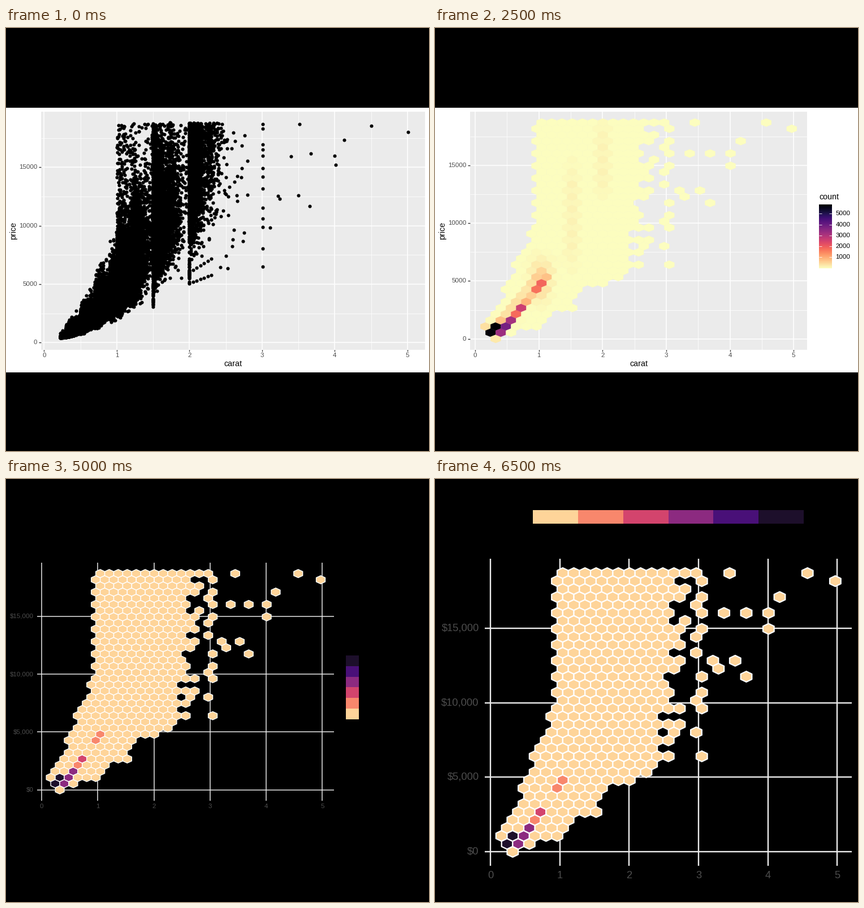
Recreate the animation shown at these times as a matplotlib script. Size 748x748 px, loop 8000 ms.

```python
import numpy as np
import matplotlib.pyplot as plt
from matplotlib.animation import FuncAnimation
from matplotlib.collections import LineCollection, PolyCollection
from matplotlib.colors import LinearSegmentedColormap, to_rgba_array
from matplotlib.patches import Rectangle

SIZE, DPI = 748, 100
PX = 72 / DPI
STEP_X, STEP_Y = 4.81 / 30, 18497 / 30
ROW_Y = STEP_Y * np.sqrt(3) / 2
HEX_MAX, BIN_MAX = 5830, 7520
plt.rcParams["font.family"] = "Liberation Sans"
BLUES = LinearSegmentedColormap.from_list("blues", ["#132B43", "#336D9B", "#56B1F7"])
MAGMA, MAGMA_R = plt.get_cmap("magma"), plt.get_cmap("magma_r")
STEP_COLORS = to_rgba_array(["#FED499", "#F8876C", "#D3446D",
                             "#8C2A80", "#491078", "#1D0F2B"])


class View:
    """Maps data to stage pixels inside a panel."""

    def __init__(self, left, right, top, bottom, x0, sx, y0, per_5000):
        self.left, self.right, self.top, self.bottom = left, right, top, bottom
        self.x0, self.sx, self.y0, self.sy = x0, sx, y0, per_5000 / 5000

    def x(self, carat):
        return self.x0 + self.sx * np.asarray(carat)

    def y(self, price):
        return self.y0 - self.sy * np.asarray(price)

    def project(self, shapes):
        return np.stack([self.x(shapes[..., 0]), self.y(shapes[..., 1])], -1)


POINT_VIEW = View(61.5, 741, 147.7, 568.3, 67, 128.5, 555.7, 103.27)
BIN_VIEW = View(61.5, 657.5, 147.7, 568.3, 71.2, 109, 549.2, 100)
HEX_VIEW = View(61.5, 657.5, 147.7, 568.3, 70.7, 112.6, 549.2, 102.33)
DOLLAR_VIEW = View(54.7, 580, 147.7, 568.3, 62.7, 99.25, 549.2, 102.33)
TOP_VIEW = View(54.7, 741, 215.6, 568.3, 65.2, 129.65, 552.2, 85.6)
WIDE_VIEW = View(54.7, 741, 228.5, 568.3, 65.2, 129.65, 552.8, 82.55)
LARGE_VIEW = View(87.5, 737, 141, 683.5, 97.5, 122.7, 658.8, 131.85)


def bump(value, center, width, power=2):
    return np.exp(-np.abs((value - center) / width) ** power)


# ---- data -------------------------------------------------------------

def stray_points(rng):
    """Lone large stones: a column at three carats, far ones and a loose fringe."""
    column = [6510, 8040, 9900, 10600, 11550, 13200, 14200,
              14900, 16000, 16500, 16950, 18300, 18700]
    far = [(3.11, 9820), (3.22, 12550), (3.24, 12300), (3.4, 15960),
           (3.5, 12580), (3.51, 18700), (3.65, 11660), (3.67, 16200),
           (4, 15980), (4.01, 15220), (4.13, 17330), (4.5, 18530), (5.01, 18018)]
    fringe = np.c_[rng.uniform(2.42, 2.8, 26), rng.uniform(6300, 18750, 26)]
    return np.r_[[(3.005, p) for p in column], far, fringe]


def gem_points(rng):
    """Stones gather just above round weights; price grows with a power of weight."""
    weights = [.22, .3, .5, .7, .9, 1, 1.2, 1.5, 1.7, 2, 2.25]
    amounts = [600, 16000, 6500, 7500, 2200, 9000, 4200, 4200, 600, 3000, 450]
    start = np.repeat(weights, amounts)
    carat = np.round(start + rng.exponential(.03 + .03 * start), 2)
    z = rng.normal(size=carat.size)
    sigma = np.where(z < 0, .25, np.where(carat < 1, .25, .29))
    price = np.exp(8.45 + 1.676 * np.log(carat) + sigma * z)
    low = 320 + 1850 * carat ** 2 * np.where(carat > 1.5, .6, .85)
    high = np.where(carat < 1, 400 + 9600 * carat ** 1.55, 18823)
    keep = (price > low) & (price < high) & (carat < 2.65)
    parts = [np.c_[carat, price][keep]]
    # Expensive stones over the one-carat block and tall columns at round weights.
    top = np.round(1 + rng.exponential(.17, 230).clip(0, .48), 2)
    parts.append(np.c_[top, rng.uniform(10500, 18800, top.size)])
    for weight, bottom, n in [(1.5, 3000, 260), (2, 5050, 160)]:
        parts.append(np.c_[np.full(n, weight), rng.uniform(bottom, 18800, n)])
    for bottom, rise in [(5050, 2450), (6000, 3900)]:
        line = np.linspace(2, 2.3, 7)
        parts.append(np.c_[line, bottom + rise * (line - 2)])
    return np.concatenate(parts)


RNG = np.random.default_rng(7)
STRAYS = stray_points(RNG)
GEMS = np.r_[gem_points(RNG), STRAYS]


# ---- binning ----------------------------------------------------------

def inside(col, row):
    """Whether a place, in hexagon columns and rows, lies in the filled cloud."""
    left = np.interp(row, [0, 2, 7, 9, 11, 13, 15, 19, 35],
                     [2, 1, 3, 3, 3.6, 4, 5.05, 5.6, 6])
    right = np.interp(row, [0, 1, 2, 4, 5, 8, 10, 13, 20, 34, 35],
                      [2.2, 4.4, 6.2, 7.6, 9.6, 10.2, 14.8, 14.9, 15.6, 16.6, 18.6])
    return left - .01 <= col <= right


def nearest_hex(carat, price):
    col, row = carat / STEP_X, price / ROW_Y
    options = []
    for r in (int(row), int(row) + 1):
        shift = r % 2 / 2
        options.append((round(col - shift) + shift, r))
    return min(options, key=lambda c: (c[0] - col) ** 2 + .75 * (c[1] - row) ** 2)


def hex_count(col, row):
    offset = col - 1 - row / 2
    small = 7600 * bump(offset, 0, .6) * bump(row, 1.5, .9)
    weights = (3450 * bump(row, 2, 1.55, 4) + 2600 * bump(row, 4.8, 1.1)
               + 1450 * bump(row, 8.5, 1.2)) * bump(offset, 1, .45)
    ridge = 400 * bump(row, 1.7 * col - 1.2, 1.2) * bump(col, 4, 2.5)
    haze = 600 * bump(col, 6.4, .9) * bump(row, 9.5, 3)
    stripes = (150 * bump(col, 9.5, .6) * bump(row, 20, 9, 4)
               + 150 * bump(col, 12.5, .6) * bump(row, 29, 6, 4))
    return 1 + small + weights + ridge + haze + stripes


def bin_count(col, row):
    u, v = col - 2, row - 1
    small = 7500 * np.exp(-(1.4 * u * u - 3.2 * u * v + 2.4 * v * v))
    ridge = 2100 * bump(col, 1 + .75 * row, .7) * bump(row, 4, 4.5)
    haze = 400 * bump(col, 6.4, 1.2) * bump(row, 9, 4)
    return 1 + small + ridge + haze


HEXES = {(c + r % 2 / 2, r) for r in range(36) for c in range(20)
         if inside(c + r % 2 / 2, r)}
HEXES = np.array(sorted(HEXES | {nearest_hex(*p) for p in STRAYS}))
BINS = {(c, r) for r in range(31) for c in range(20)
        if inside(c + .5, (r + .5) * STEP_Y / ROW_Y)}
BINS = np.array(sorted(BINS | {(int(c / STEP_X), int(p / STEP_Y)) for c, p in STRAYS}))
HEX_COUNTS = hex_count(*HEXES.T)
BIN_COUNTS = bin_count(*BINS.T)


# ---- drawing ----------------------------------------------------------

fig = plt.figure(figsize=(SIZE / DPI, SIZE / DPI), dpi=DPI, facecolor="black")
ax = fig.add_axes([0, 0, 1, 1])


def box(x0, x1, y0, y1, color):
    ax.add_patch(Rectangle((x0, y0), x1 - x0, y1 - y0, fc=color, ec="none"))


def lines(segments, color, width):
    ax.add_collection(LineCollection(segments, colors=color, linewidths=width * PX,
                                     capstyle="butt"))


def label(x, y, text, color="#4D4D4D", size=11.5, ha="center", **kw):
    ax.text(x, y, text, color=color, fontsize=size * PX, ha=ha, va="center", **kw)


def price_breaks(view):
    return [p for p in range(0, 20001, 5000) if view.y(p) > view.top]


def grid(view, color, minor=True, scale=1.0):
    def segments(xs, ys):
        return ([[(x, view.top), (x, view.bottom)] for x in view.x(xs)]
                + [[(view.left, y), (view.right, y)] for y in view.y(ys)])
    if minor:
        lines(segments(np.arange(.5, 5), np.arange(2500, 18000, 5000)), color, .75)
    lines(segments(np.arange(6), price_breaks(view)), color, 1.5 * scale)


def axis_labels(view, fmt="{}", scale=1.0):
    size = 11.5 * scale
    for carat in range(6):
        label(view.x(carat), view.bottom + 10.7 * scale, carat, size=size)
    for price in price_breaks(view):
        label(view.left - 6.5 * scale, view.y(price), fmt.format(price),
              size=size, ha="right")


def light_theme(view):
    box(-1, SIZE, 140.4, 608.4, "white")
    box(view.left, view.right, view.top, view.bottom, "#EBEBEB")
    grid(view, "white")
    ticks = [[(x, view.bottom), (x, view.bottom + 3.6)] for x in view.x(np.arange(6))]
    ticks += [[(view.left - 3.6, y), (view.left, y)] for y in view.y(price_breaks(view))]
    lines(ticks, "#333333", 1.4)
    axis_labels(view)
    label((view.left + view.right) / 2, 594, "carat", "black", 14.3)
    label(13, 358, "price", "black", 14.3, rotation=90)


def step_bar(x0, x1, y0, y1):
    """Light to dark, rightwards in a wide bar and upwards in a tall one."""
    wide = x1 - x0 > y1 - y0
    edges = np.linspace(x0, x1, 7) if wide else np.linspace(y1, y0, 7)
    for a, b, color in zip(edges, edges[1:], STEP_COLORS):
        box(*((a, b, y0, y1) if wide else (x0, x1, b, a)), color)


SIDE_BAR = (679, 701.5, 311.8, 424.2)


def legend(cmap, top, values):
    left, right, high, low = SIDE_BAR
    label(left, 299, "count", "black", 14.3, ha="left")
    if cmap is None:
        step_bar(*SIDE_BAR)
        heights = np.linspace(low, high, 7)[1:6]
    else:
        ax.imshow(np.linspace(1, 0, 256)[:, None], cmap=cmap, aspect="auto",
                  extent=(left, right, low, high), interpolation="bilinear")
        heights = low - (low - high) * np.array(values) / top
        lines([[(a, y), (a + 4.5, y)] for y in heights for a in (left, right - 4.5)],
              "white", .8)
    for y, value in zip(heights, values):
        label(708, y, value, "black", ha="left")


def tiles(view):
    corners = np.array([(0, 0), (1, 0), (1, 1), (0, 1)])
    shapes = (BINS[:, None] + corners) * [STEP_X, STEP_Y]
    ax.add_collection(PolyCollection(
        view.project(shapes), facecolors=BLUES(BIN_COUNTS / BIN_MAX),
        edgecolors="none", snap=False))


def hexes(view, colors, outline=0):
    angle = np.pi / 6 + np.arange(6) * np.pi / 3
    corners = np.c_[np.cos(angle) * STEP_X / np.sqrt(3), np.sin(angle) * ROW_Y / 1.5]
    shapes = (HEXES * [STEP_X, ROW_Y])[:, None] + corners
    ax.add_collection(PolyCollection(
        view.project(shapes), facecolors=colors, linewidths=(outline or .3) * PX,
        edgecolors="white" if outline else "face"))


def step_fill():
    return STEP_COLORS[np.minimum(HEX_COUNTS // 1000, 5).astype(int)]


def scatter_scene(alpha):
    view = POINT_VIEW
    light_theme(view)
    ax.plot(view.x(GEMS[:, 0]), view.y(GEMS[:, 1]), "o", color="black",
            ms=6.1 * PX, mew=0, alpha=alpha)


def tile_scene():
    light_theme(BIN_VIEW)
    tiles(BIN_VIEW)
    legend(BLUES, BIN_MAX, [2000, 4000, 6000])


def hex_scene(cmap, outline=0):
    light_theme(HEX_VIEW)
    hexes(HEX_VIEW, step_fill() if cmap is None else cmap(HEX_COUNTS / HEX_MAX), outline)
    legend(cmap, HEX_MAX, range(1000, 5001, 1000))


def dark_scene(view, bar, fmt="${:,}", minor=False, scale=1.0):
    grid(view, "#EBEBEB", minor, scale)
    axis_labels(view, fmt, scale)
    hexes(view, step_fill(), 1.4 * scale)
    step_bar(*bar)


SCENES = [
    lambda: scatter_scene(1),
    lambda: scatter_scene(.1),
    tile_scene,
    lambda: hex_scene(BLUES),
    lambda: hex_scene(MAGMA),
    lambda: hex_scene(MAGMA_R),
    lambda: hex_scene(None),
    lambda: hex_scene(None, 1.4),
    lambda: dark_scene(HEX_VIEW, SIDE_BAR, "{}", minor=True),
    lambda: dark_scene(HEX_VIEW, SIDE_BAR, "{}"),
    lambda: dark_scene(DOLLAR_VIEW, (601, 623.5, 311.8, 424.2)),
    lambda: dark_scene(TOP_VIEW, (411.5, 524, 154.8, 177.3)),
    lambda: dark_scene(WIDE_VIEW, (248.2, 547.3, 174.7, 189.7)),
    lambda: dark_scene(LARGE_VIEW, (172.8, 651.3, 54.8, 78.8), scale=1.6),
]


def update(frame):
    ax.clear()
    ax.axis("off")
    SCENES[min(frame, len(SCENES) - 1)]()
    # Whole numbers fall on pixel centres.
    ax.set_xlim(-.5, SIZE - .5)
    ax.set_ylim(SIZE - .5, -.5)
    # Keep drawing order equal to call order.
    for order, artist in enumerate(ax.get_children()):
        artist.set_zorder(order)
    return []


anim = FuncAnimation(fig, update, frames=16, interval=500, repeat=True,
                     repeat_delay=0, init_func=lambda: [])
plt.show()
```
